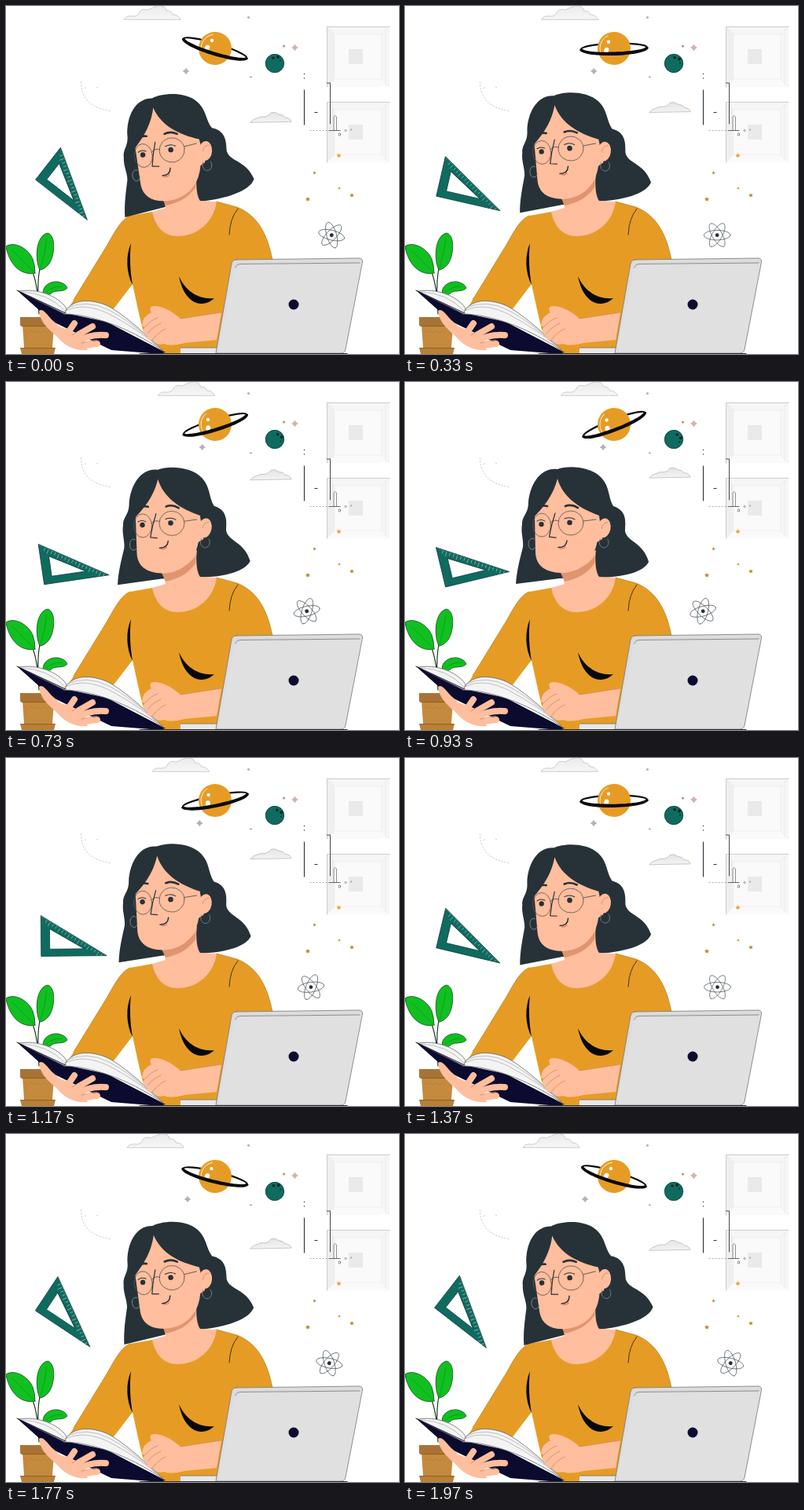
Animation of 500x443 px, one loop 2010 ms. Source, as an HTML page with a canvas:

```html
<!DOCTYPE html>
<html lang="en">
<head>
<meta charset="utf-8">
<title>Studying</title>
<style>
html, body { margin: 0; width: 100%; height: 100%; overflow: hidden; background: #fff; }
canvas { display: block; width: 500px; height: 443px; }
</style>
</head>
<body>
<canvas id="stage"></canvas>
<script>
const W = 500, H = 443, LOOP = 2010;
const INK = '#263238', SKIN = '#ffbe9d', SHADE = '#e0946f', KNIT = '#e69c24';
const TEAL = '#0f6b60', NAVY = '#0a0b2e', LEAF = '#10c020', GREY = '#e0e0e0';
const canvas = document.getElementById('stage');
const ctx = canvas.getContext('2d');
const dpr = window.devicePixelRatio || 1;
canvas.width = W * dpr;
canvas.height = H * dpr;
ctx.lineCap = ctx.lineJoin = 'round';

const mix = (a, b, p) => a + (b - a) * p;
const rad = deg => deg * Math.PI / 180;

// cubic-bezier(0, 0, .58, 1)
function easeOut(x) {
  let lo = 0, hi = 1;
  for (let i = 0; i < 24; i++) {
    const s = (lo + hi) / 2;
    if (3 * (1 - s) * s * s * 0.58 + s * s * s < x) lo = s; else hi = s;
  }
  return 3 * (1 - lo) * lo * lo + lo * lo * lo;
}

function fill(d, color, rule = 'nonzero') {
  ctx.fillStyle = color;
  ctx.fill(new Path2D(d), rule);
}
function line(d, width = 1, color = INK) {
  ctx.strokeStyle = color;
  ctx.lineWidth = width;
  ctx.stroke(new Path2D(d));
}
function oval(x, y, rx, ry, color, tilt = 0) {
  ctx.beginPath();
  ctx.ellipse(x, y, rx, ry, tilt, 0, 7);
  ctx.fillStyle = color;
  ctx.fill();
}
function ring(x, y, rx, ry, width, color = INK, tilt = 0, from = 0, to = Math.PI * 2) {
  ctx.beginPath();
  ctx.ellipse(x, y, rx, ry, tilt, from, to);
  ctx.strokeStyle = color;
  ctx.lineWidth = width;
  ctx.stroke();
}
const dot = (x, y, r, color) => oval(x, y, r, r, color);

function at(x, y, angle, draw) {
  ctx.save();
  ctx.translate(x, y);
  ctx.rotate(angle);
  draw();
  ctx.restore();
}
function star(x, y, r, points, inner, color) {
  ctx.beginPath();
  for (let i = 0; i < points * 2; i++) {
    const a = -Math.PI / 2 + i * Math.PI / points, k = i % 2 ? r * inner : r;
    ctx.lineTo(x + k * Math.cos(a), y + k * Math.sin(a));
  }
  ctx.closePath();
  ctx.fillStyle = color;
  ctx.fill();
}
function fade(y0, y1, a, b) {
  const g = ctx.createLinearGradient(0, y0, 0, y1);
  g.addColorStop(0, a);
  g.addColorStop(1, b);
  return g;
}

function shelf(y) {
  at(408, y, 0, () => {
    fill('M0 0H80V77H0Z', '#f6f6f6');
    fill('M0 0L10 10V67L0 77Z', '#efefef');
    fill('M0 77L10 67H70L80 77Z', '#fafafa');
    fill('M10 10H70V67H10Z', '#fafafa');
    line('M10 10H70V67H10ZM0 0L10 10M80 0L70 10M0 77L10 67M80 77L70 67M75 3V74', 0.6, '#e6e6e6');
    line('M0.5 77V0.5H80', 1, '#cfcbc9');
    fill('M28 29H46V48H28Z', '#eaeaea');
  });
}

function wall() {
  shelf(26);
  shelf(122);
  line('M379.5 107V151', 1.1);
  dot(379.5, 86.5, 0.7, INK);
  dot(379.5, 92, 0.7, INK);
  line('M408.5 98H412.5V150', 1, '#444b50');
  line('M393 135.5H396', 1.2);
  line('M417 158V141Q418.5 138 420.5 141V158', 0.8, '#777');
  ctx.setLineDash([1, 3]);
  line('M387 158.5H411', 0.9, '#999');
  line('M95.5 97Q96 128 132 133.5', 0.8, '#aaa');
  ctx.setLineDash([]);
  line('M411 158.5H425', 0.9, '#555');
  ring(424.5, 163.5, 1.2, 1.8, 0.7, '#555');
  ring(432, 158.5, 1.2, 1.2, 0.6, '#777');
  dot(439, 157.5, 1, '#999');
  dot(101, 104, 0.6, '#999');
  dot(116, 103.5, 0.6, '#999');
  star(423.5, 190.5, 3.2, 5, 0.5, '#efa02c');
  star(384, 246, 3.2, 5, 0.5, '#c98428');
  star(440, 241, 2.8, 5, 0.5, '#c98428');
  star(392.5, 212.5, 2.2, 5, 0.5, '#c98428');
  star(424, 232, 1.7, 5, 0.5, '#c98428');
  star(367.5, 53, 4.5, 4, 0.55, '#d3b3aa');
  dot(308.5, 14.5, 1.5, '#c9a199');
  dot(353.5, 51, 1.6, '#c08d80');
  dot(311.5, 90.5, 1.3, '#c9a199');
}

function sky(p) {
  at(mix(150, 199, p), 0, 0, () => {
    const d = 'M0 17Q3 12 10 13Q18 14 20 7Q23 3 30 5Q37 2 42 0Q52 -2 54 6Q61 6 62 11Q69 11 72 17Z';
    fill(d, fade(0, 17, '#ebebeb', '#f6f6f6'));
    line(d, 0.7, '#bdb9b7');
  });
  at(311, mix(135, 108.5, p), 0, () => {
    const d = 'M0 13Q3 9 8 8Q13 5 19 6Q24 5 26 1Q32 -1 36 3Q42 3 44 7Q50 7 52 12Z';
    fill(d, fade(0, 13, '#e4e4e4', '#f3f3f3'));
    line(d, 0.7, '#b5afac');
  });
  star(mix(229, 252.3, p), 83, 4.3, 4, 0.55, '#b9b0ad');

  at(266, 54, rad(mix(17, -21.5, p)), () => {
    ctx.save();
    ctx.beginPath();
    ctx.rect(-50, -30, 100, 31);
    ctx.clip();
    ring(0, 0, 42, 6.3, 2.2, '#0a0a0a');
    ctx.restore();
    dot(0, 0, 21, KNIT);
    dot(-6.8, -8.5, 2.2, '#fff');
    oval(-9.8, 2, 3, 3.6, '#fff', 0.3);
    ring(0, 0, 18, 18, 0.9, '#fff3d6', 0, 2.7, 4.3);
    fill('M-44 0C-43 12 43 12 44 0L41 -1C36 6.5 -36 6.5 -41 -1Z', '#0a0a0a');
  });

  at(342, 73, rad(mix(0, 52, p)), () => {
    dot(0, 0, 12, TEAL);
    ring(0, 0, 11.7, 11.7, 0.7, '#15463f');
    oval(-2, -7, 1.9, 1.6, '#07251f');
    oval(4, -8, 1.8, 2, '#07251f');
    dot(7, -3.5, 0.9, '#07251f');
  });

  at(mix(414.3, 378.8, p), 291.7, rad(mix(14, -16, p)), () => {
    for (const a of [0, 60, 120]) ring(0, 0, 17, 6.3, 0.8, '#59636a', rad(a));
    dot(0, 0, 2.4, INK);
  });
}

function setSquare(p) {
  at(86, 226.5, rad(mix(38, -14, p)), () => {
    const d = 'M-41.5 -26V25.5H41.5ZM-30.5 -9V16.5H13Z';
    fill(d, TEAL, 'evenodd');
    line(d, 0.8, '#173f3d');
    let ticks = '';
    for (let i = 2; i < 20; i++) {
      const x = -41.5 + i * 4.1, y = -26 + i * 2.55, n = i % 3 ? 3 : 5;
      ticks += `M${x - 0.6} ${y + 1}l${-n * 0.53} ${n * 0.85}`;
    }
    line(ticks, 0.6, '#b9d8d3');
  });
}

function plant() {
  line('M34 339Q41 358 42 392M43 334Q39 355 42 392M49 366Q43 374 42 392', 1.2, '#1c3a20');
  const leaves = [
    'M37 340C20 344 4 330 0 306C10 299 28 308 34 322Q37 330 37 340Z',
    'M43 336C36 322 38 292 53 289C64 292 62 318 55 328Q50 335 43 336Z',
    'M47 367C46 356 56 350 66 351Q76 353 78 359C74 364 66 362 60 364Q52 371 47 367Z'
  ];
  for (const d of leaves) {
    fill(d, LEAF);
    line(d, 0.8, '#175020');
  }
  line('M35 338Q22 325 8 311M44 333Q50 314 52 296M50 365Q58 357 72 357', 0.6, '#0a8a1a');
  fill('M21 406H61L59 435H23Z', '#c48a3e');
  fill('M18 396H62V407H18Z', '#a87436');
  fill('M18 435H63L61 443H20Z', '#b98039');
  line('M20 407.5H61M19 435.5H62', 0.9, '#875b25');
  line('M24 413l4 3l4 -3l4 3l4 -3l4 3l4 -3l4 3', 0.6, '#ad7734');
}

function body() {
  fill('M186 262L158 267C147 271 139 286 129 304L80 384L135 388L161 354C166 378 170 395 174 412L203 443H272L290 325L339 323C333 292 321 267 294 256L268 249Z', KNIT);
  line('M158 267C147 271 139 286 129 304L86 374M268 249L294 256C321 267 333 292 339 323', 0.7, '#b37a20');
  fill('M159 302C152 318 153 340 161 355C158 338 157 320 159 302Z', '#090909');
  fill('M220 344C228 362 244 374 265 372C250 386 227 380 220 344Z', '#090909');
  line('M295 258Q285 270 284 291', 0.9, '#2a2a2a');
}

function head(p) {
  const turn = draw => at(242, 180, -0.125 * (1 - p), () => {
    ctx.translate(-242, -180);
    draw();
  });
  turn(() => fill('M194 111C207 106 236 107 250 122C261 134 258 146 265 158C284 164 280 181 280 190C283 204 303 204 310 229C304 241 281 249 242 249L197 250L141 257C142 240 146 226 150 210C151 201 147 191 149 181C149 170 157 168 157 153C159 131 172 108 194 111Z', INK));
  fill('M198 234L243 214C241 228 243 243 247 248L268 249C264 276 243 293 218 293C201 293 190 281 186 262L203 257Z', SKIN);
  fill('M198 243C216 242 234 233 242 220L241 231C231 245 218 251 203 254Z', SHADE);
  turn(() => {
    oval(253, 186, 8.5, 12.5, SKIN, 0.2);
    fill('M194 123C201 147 222 161 247 170L251 200C246 203 244 203 244 206C238 231 220 243 198 243C177 242 167 233 166 218L165 171C174 161 188 147 194 123Z', SKIN);
    line('M250 186Q252 178 258 179', 0.8, '#d9855f');
    line('M168 161Q174 156 181 158M204 158Q212 155 220 160', 2.6);
    dot(173.5, 181, 3.2, INK);
    dot(209.5, 179, 3.3, INK);
    line('M168 177Q173 174 178 177M203 174Q210 171 216 175', 1);
    ring(174, 182, 11.5, 15, 0.8, '#5c5552');
    ring(211, 179.5, 16, 15.5, 0.8, '#5c5552');
    line('M185 179Q190 174 195.5 177M227 177L243 175', 0.9, '#5c5552');
    line('M191 167Q186 182 183.5 197L192 198', 1.2);
    line('M195 210.5Q205 211 206 202', 1.5);
    line('M197 212Q202 213 204 210', 1, '#cd704f');
    ring(253, 204, 6, 7, 0.9, '#777f82', 0, -0.6, 3.8);
    ring(162, 206, 5, 7, 0.8, '#8c9497', 0, 0.4, 5.2);
  });
}

function book() {
  fill('M14 362L76 391L128 402L203 441L196 443L134 438L62 403L42 387Z', NAVY);
  const left = 'M17 363C38 359 66 368 77 385L75 392Z';
  const right = 'M74 392C82 372 108 372 130 382C151 393 180 420 200 439C166 416 118 393 74 392Z';
  for (const d of [left, right]) {
    fill(d, '#f4f4f4');
    line(d, 0.8, '#666');
  }
  line('M20 364Q53 365 75 388M76 388Q100 376 133 393Q170 413 196 435M78 384Q103 373 131 387Q160 402 190 431', 0.6, '#999');
  line('M14 362L76 391', 1, '#1b1b28');
}

function leftHand() {
  fill('M42 388C46 384 52 392 58 399L68 408L84 414L100 426L104 438C84 440 72 429 63 419C53 411 43 401 42 388Z', SKIN);
  line('M76 420L87 404', 8, SKIN);
  line('M82 424L110 408', 8, SKIN);
  line('M90 427Q108 417 127 419', 8, SKIN);
  line('M92 433L116 430', 8, SKIN);
  line('M96 429Q106 426 116 425M84 419L92 414', 0.8, '#d9855f');
}

function rightArm() {
  fill('M274 390L222 398C212 389 200 382 188 382C183 382 182 386 185 390C178 394 174 398 174 403C172 406 174 409 177 408C172 415 176 419 180 417C177 424 182 427 187 424C188 430 195 432 201 430C209 433 219 431 227 429L268 425Z', SKIN);
  line('M177 408Q184 400 193 397M180 417Q188 407 197 404M187 424Q194 415 203 411M222 398L274 390', 0.8, '#d9855f');
}

function laptop() {
  fill('M222 435H270V443H222Z', '#e8e8e8');
  line('M222 435H268', 0.9, '#777');
  const lid = 'M293 323L449 321Q454 321 453.5 326L432 437Q431 442 426 442H267L287 328Q288 323 293 323Z';
  fill(lid, '#dcdcdc');
  fill('M298 328.5L453 326.5L432 437Q431 442 426 442H269L291 333Q292 328.5 298 328.5Z', GREY);
  line(lid, 0.8, '#777');
  line('M450 327L298 328.5Q293 328.5 292 333', 0.8, '#777');
  dot(366, 380, 6.5, NAVY);
  line('M170 442.5H434', 1, '#333');
}

function draw(now) {
  const t = now % LOOP, half = LOOP / 2;
  const p = t < half ? easeOut(t / half) : 1 - easeOut((t - half) / half);
  ctx.setTransform(dpr, 0, 0, dpr, 0, 0);
  ctx.fillStyle = '#fff';
  ctx.fillRect(0, 0, W, H);
  wall();
  sky(p);
  setSquare(p);
  plant();
  body();
  head(p);
  book();
  leftHand();
  rightArm();
  laptop();
}

const start = performance.now();
function tick() {
  draw(performance.now() - start);
  requestAnimationFrame(tick);
}
tick();
</script>
</body>
</html>
```
